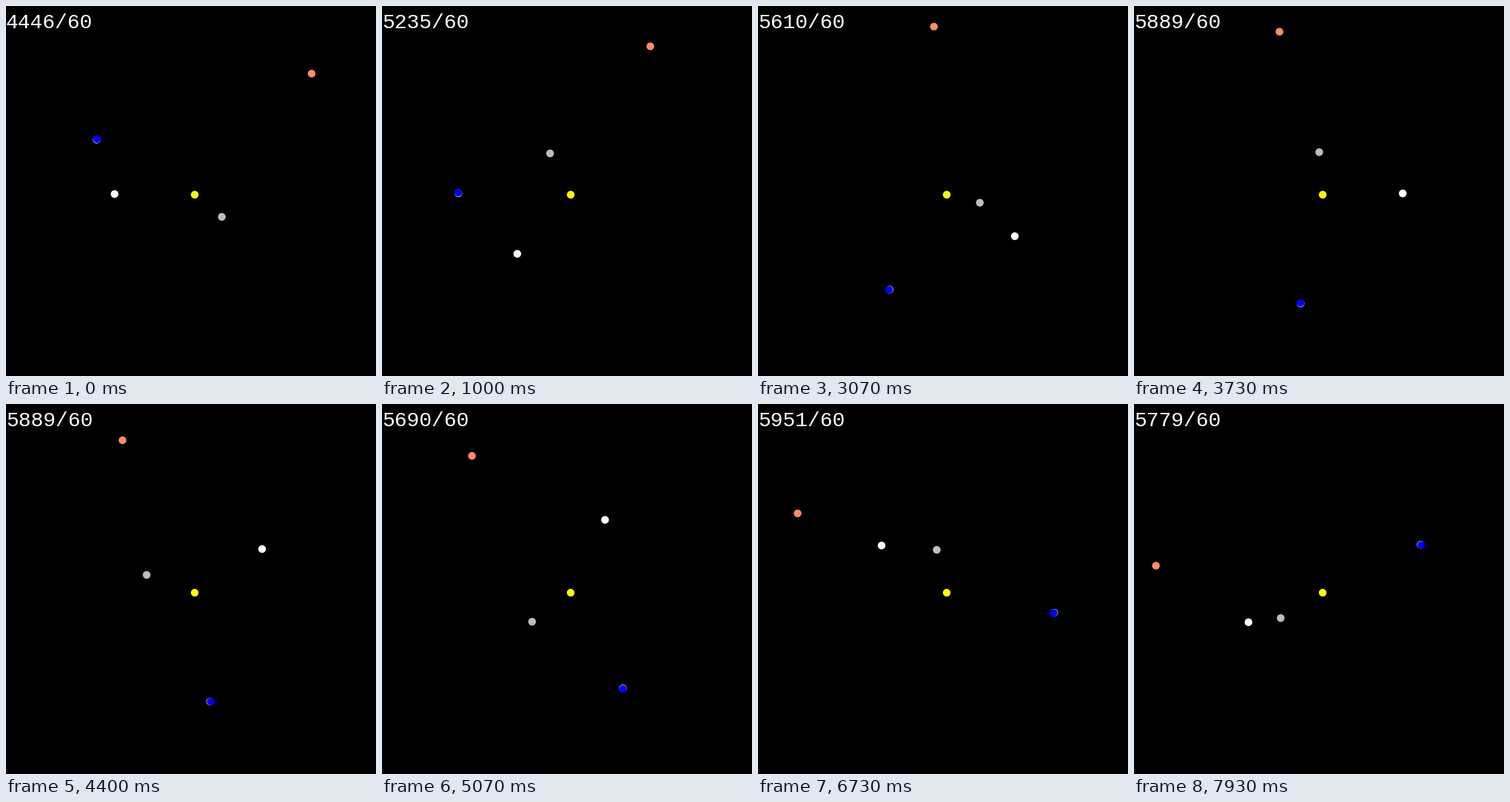
These frames come from a looping animation (500x500 px, 8 s). A matplotlib script:

```python
import math
import matplotlib.pyplot as plt
from matplotlib.animation import FuncAnimation
from matplotlib.patches import Circle

SIZE, DPI = 500, 100
FRAMES, INTERVAL = 400, 20
SUN = 255
DOT = 5.2

# semi-major axis, eccentricity, perihelion angle, start anomaly, degrees per step
ORBITS = {
    "mercury": (57.9, 0.2056, -6.1, -21.8, 8.195),
    "venus": (108.2, 0.0068, 275, -94.7, 3.2114),
    "earth": (149.6, 0.0167, 345, 164.9, 1.9726),
    "mars": (227.9, 0.002, 20, 25.9, 1.0487),
}
COLORS = {"mercury": "#bebebe", "venus": "#ffffff", "moon": "#ffffff",
          "earth": "#0000ff", "mars": "#ff8c66"}
MOON_DIST, MOON_START, MOON_STEP = 0.6, -115, 26.35

# the rate readout is refreshed every 14 steps
RATES = [4446, 5235, 5452, 5610, 5889, 5690, 5862, 5951, 5779]


def kepler(orbit, step):
    a, e, peri, start, rate = orbit
    m = math.radians(start + rate * step)
    ecc = m
    for _ in range(6):
        ecc -= (ecc - e * math.sin(ecc) - m) / (1 - e * math.cos(ecc))
    x = a * (math.cos(ecc) - e)
    y = a * math.sqrt(1 - e * e) * math.sin(ecc)
    w = math.radians(peri)
    return (SUN + x * math.cos(w) - y * math.sin(w),
            SUN - x * math.sin(w) - y * math.cos(w))


fig = plt.figure(figsize=(SIZE / DPI, SIZE / DPI), dpi=DPI, facecolor="black")
ax = fig.add_axes([0, 0, 1, 1])
ax.set_xlim(0, SIZE)
ax.set_ylim(SIZE, 0)
ax.axis("off")


def dot(color, radius=DOT):
    return ax.add_patch(Circle((SUN, SUN), radius, fc=color, lw=0))


dot("#ffff00")
dots = {name: dot(color) for name, color in COLORS.items()}
label = ax.text(0, 30, "", color="white", family="Liberation Mono",
                fontsize=28 * 72 / DPI, va="baseline", ha="left")


def draw(i):
    # positions advance 15 times a second, in hard steps
    step = (3 * i + 2) // 10
    for name, orbit in ORBITS.items():
        dots[name].center = kepler(orbit, step)
    x, y = dots["earth"].center
    t = math.radians(MOON_START + MOON_STEP * step)
    dots["moon"].center = (x + MOON_DIST * math.cos(t),
                           y - MOON_DIST * math.sin(t))
    label.set_text(f"{RATES[(step + 1) // 14]}/60")
    return [*dots.values(), label]


anim = FuncAnimation(fig, draw, frames=FRAMES, interval=INTERVAL,
                     repeat=True, repeat_delay=0, blit=False)
plt.show()
```
